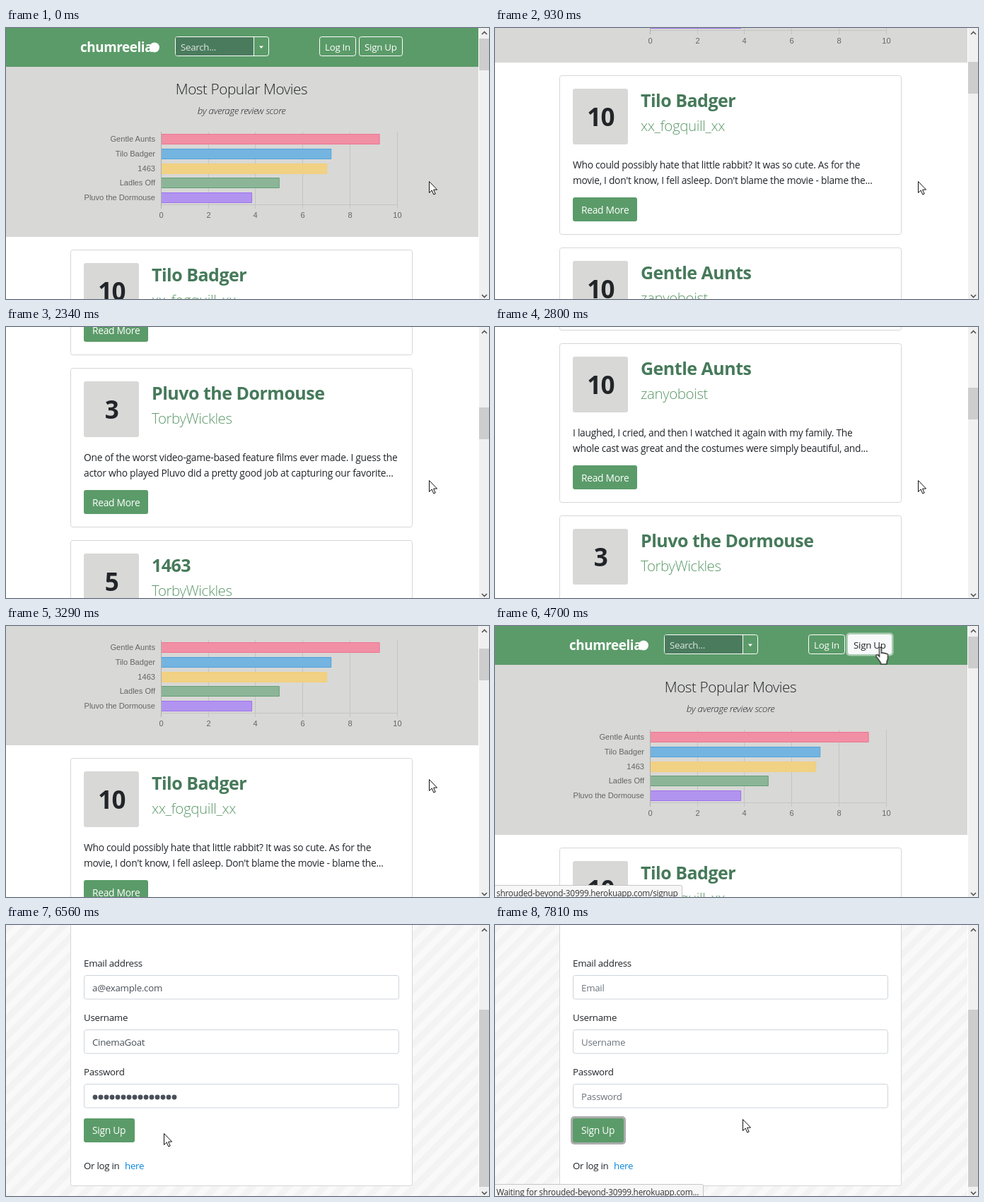
Animation, 683 px wide and 384 px high, one loop 8000 ms. Source, as an HTML page:

```html
<!DOCTYPE html>
<html lang="en">
<head>
<meta charset="utf-8">
<title>Movie reviews</title>
<style>
  html, body { margin: 0; width: 100%; height: 100%; overflow: hidden; background: #fff; }
  svg { display: block; width: 100%; height: 100%; }
  text { font-family: "Open Sans", "Noto Sans", sans-serif; font-size: 13.3px; letter-spacing: -.02em; fill: #212529; white-space: pre; }
  .white { fill: #fff; }
  .search { fill: #dfe7e2; }
  .logo { font-size: 18.8px; font-weight: 700; fill: #fff; }
  .heading { font-size: 20.7px; font-weight: 300; text-anchor: middle; }
  .sub { font-weight: 300; font-style: italic; text-anchor: middle; }
  .axis { font: 11.1px "Liberation Sans", Arial, sans-serif; letter-spacing: 0; fill: #646765; }
  .row { text-anchor: end; }
  .tick { text-anchor: middle; }
  .score { font-size: 35px; font-weight: 700; text-anchor: middle; }
  .title { font-size: 25px; font-weight: 700; fill: #467a5a; }
  .user { font-size: 20.5px; font-weight: 300; fill: #5b9968; }
  .body { font-size: 13.8px; }
  .value { fill: #495057; }
  .hint { fill: #6c757d; }
  .link { fill: #0a86dc; }
  .status { font-size: 11.8px; fill: #333; }
</style>
</head>
<body>
<svg id="stage" viewBox="0 0 683 384"></svg>
<script>
const LOOP = 8000;
const GREEN = '#5b9b69', GREY = '#d8d8d6', LINE = '#d6d6d6';

const text = (x, y, str, cls = '') => `<text x="${x}" y="${y}" class="${cls}">${str}</text>`;
const rect = (x, y, w, h, fill, r = 0) =>
  `<rect x="${x}" y="${y}" width="${w}" height="${h}" rx="${r}" fill="${fill}"/>`;
const box = (x, y, w, h, stroke, fill = '#fff') =>
  `<rect x="${x + .5}" y="${y + .5}" width="${w - 1}" height="${h - 1}" rx="3" fill="${fill}" stroke="${stroke}"/>`;
const path = (d, attrs) => `<path d="${d}" ${attrs}/>`;
const group = (id, content) => `<g id="${id}">${content}</g>`;

const nav = () =>
  rect(0, 0, 668, 55, GREEN) +
  text(105, 34, 'chumreelia', 'logo') +
  '<circle cx="210" cy="27.5" r="7" fill="#fff"/>' +
  box(239, 12, 133, 28, '#fff', GREEN) +
  rect(240, 13, 110, 26, '#4a7b5d', 2) +
  rect(350, 12, 1, 28, '#fff') +
  text(247, 32, 'Search...', 'search') +
  path('M358 25.5h6l-3 3.5z', 'fill="#fff"') +
  box(443, 12, 52, 28, '#fff', GREEN) + text(451, 32, 'Log In', 'white') +
  box(499, 12, 62, 28, '#fff', GREEN) + text(507, 32, 'Sign Up', 'white');

const bars = [
  ['Gentle Aunts', 9.25, '#f18fa5', '#ee748d'],
  ['Tilo Badger', 7.2, '#74b4e0', '#4fa3dc'],
  ['1463', 7.02, '#f1d184', '#f2cf78'],
  ['Ladles Off', 5, '#8cb598', '#64a073'],
  ['Pluvo the Dormouse', 3.84, '#b194ef', '#9d72ee'],
];
const unit = 33.36;

function chart() {
  let out = rect(219, 250, 334, 1, '#c4c4c2');
  for (let v = 0; v <= 10; v += 2) {
    const x = Math.round(219 + v * unit);
    out += rect(x, 147, 1, 109, v ? '#c4c4c2' : '#adadab') + text(x + .5, 269, v, 'axis tick');
  }
  bars.forEach(([name, value, fill, edge], i) => {
    const y = Math.round(150 + i * 20.75), end = 219.5 + value * unit;
    out += text(211, y + 11, name, 'axis row') + rect(220, y, end - 220, 15, fill) +
      path(`M220 ${y + .5}H${end}v14H220`, `fill="none" stroke="${edge}"`);
  });
  return out;
}

const reviews = [
  ['10', 'Tilo Badger', 'xx_fogquill_xx',
    'Who could possibly hate that little rabbit? It was so cute. As for the',
    "movie, I don't know, I fell asleep. Don't blame the movie - blame the..."],
  ['10', 'Gentle Aunts', 'zanyoboist',
    'I laughed, I cried, and then I watched it again with my family. The',
    'whole cast was great and the costumes were simply beautiful, and...'],
  ['3', 'Pluvo the Dormouse', 'TorbyWickles',
    'One of the worst video-game-based feature films ever made. I guess the',
    'actor who played Pluvo did a pretty good job at capturing our favorite...'],
  ['5', '1463', 'TorbyWickles',
    'It was fine, but I kept waiting for something to happen. I guess the',
    'camera work was pretty good, but the story could have been a little...'],
];

const card = ([score, title, user, line1, line2], i) => {
  const y = 314 + i * 244;
  return box(91, y, 484, 226, LINE) + rect(110, y + 19, 78, 79, GREY, 3) +
    text(149.5, y + 72, score, 'score') + text(206, y + 45, title, 'title') +
    text(206, y + 79, user, 'user') +
    text(110, y + 132, line1, 'body') + text(110, y + 154, line2, 'body') +
    rect(110, y + 173, 91, 34, GREEN, 3) + text(122, y + 196, 'Read More', 'white body');
};

const scrollbar = (id, length) =>
  rect(668, 0, 15, 384, '#f0f0f0') + rect(668, 0, 1, 384, '#fff') +
  group(id, rect(669, 15, 14, length, '#cdcdcd')) +
  path('M673 9l3.5-3.5 3.5 3.5M673 378l3.5 3.5 3.5-3.5', 'fill="none" stroke="#555" stroke-width="1.7"');

const home = rect(0, 0, 683, 384, '#fff') +
  group('homePage',
    nav() + rect(0, 55, 668, 241, GREY) +
    text(333, 94, 'Most Popular Movies', 'heading') +
    text(333, 122, 'by average review score', 'sub') +
    chart() + reviews.map(card).join('') +
    group('navRing', rect(496.5, 9.5, 67, 33, '#abcdb3', 5)) +
    group('navHover', rect(499, 12, 62, 28, '#f8f9fa', 3) + text(507, 32, 'Sign Up'))) +
  scrollbar('homeThumb', 45);

const field = (name, y, label, hint, value) =>
  text(110, y - 12, label) + box(110, y, 446, 34.5, '#ced4da') +
  group(name + 'Hint', text(122, y + 23, hint, 'hint')) + group(name + 'Value', value);

const dots = Array.from({ length: 15 }, (_, i) =>
  `<circle cx="${126 + i * 8}" cy="405" r="3.4" fill="#495057"/>`).join('');

const signup = rect(0, 0, 668, 384, 'url(#stripes)') +
  group('signPage',
    nav() + box(91, 73, 484, 458, LINE) +
    text(333, 122, 'Sign Up', 'heading') +
    field('email', 232, 'Email address', 'Email', text(122, 255, 'a@example.com', 'value')) +
    field('user', 309, 'Username', 'Username', text(122, 332, 'CinemaGoat', 'value')) +
    field('pass', 386, 'Password', 'Password', dots) +
    group('formRing', rect(107, 432, 78, 40, '#a9acab', 5)) +
    rect(110, 435, 72, 34, GREEN, 3) +
    group('formHover', rect(110, 435, 72, 34, '#4d8459', 3)) +
    text(122, 457, 'Sign Up', 'white body') +
    text(110, 507, 'Or log in') + text(168, 507, 'here', 'link')) +
  scrollbar('signThumb', 251);

const status = (id, width, str) =>
  group(id, path(`M-1 367.5H${width - 2.5}q2 0 2 2V385H-1z`, 'fill="#f7f7f7" stroke="#c6c6c6"') +
    text(2, 383, str, 'status'));

document.getElementById('stage').innerHTML = `<defs>
  <pattern id="stripes" width="18" height="18" patternUnits="userSpaceOnUse" patternTransform="rotate(45)">
    ${rect(0, 0, 18, 18, '#f9f9f9') + rect(0, 0, 9, 18, '#f3f3f3')}
  </pattern></defs>` +
  group('signup', signup) + group('home', home) +
  status('linkStatus', 265, 'shrouded-beyond-30999.herokuapp.com/signup') +
  status('waitStatus', 295, 'Waiting for shrouded-beyond-30999.herokuapp.com...') +
  group('cursor',
    group('arrow', path('M.5.5V16.5l3.7-3.5 2.6 6 2.4-1-2.6-5.9h5z', 'fill="#fff" stroke="#111"')) +
    group('hand', path('M0 1.5C0-.5 3-.5 3 1.5V9c0-1.5 3.3-1.5 3.3.3 0-1.5 3-1.3 3 .7 0-1.3 2.7-1 2.7 1v5c0 2-1.5 3-1.5 5.5V24H2v-2C0 19-3 15-4.5 13c-1-2 1.5-3 3-1.5l1.5 2z',
      'fill="#fff" stroke="#111" stroke-width="1.2"')));

// Each step holds its style until the next one; step times must differ.
function play(id, steps) {
  const frames = steps.map(([t, style]) => ({ offset: t / LOOP, easing: 'step-end', ...style }));
  frames.push({ ...frames[frames.length - 1], offset: 1 });
  const motion = document.getElementById(id).animate(frames, { duration: LOOP, iterations: Infinity });
  motion.startTime = 0;
}
const move = (id, steps) =>
  play(id, steps.map(([t, x, y]) => [t, { transform: `translate(${x}px, ${y}px)` }]));
const toggle = (id, visible, ...times) =>
  play(id, [0, ...times].map((t, i) => [t, { opacity: visible === (i % 2 === 0) ? 1 : 0 }]));
const scroll = (page, thumb, ratio, steps) => {
  move(page, steps.map(([t, y]) => [t, 0, -y]));
  move(thumb, steps.map(([t, y]) => [t, 0, Math.round(y * ratio)]));
};

scroll('homePage', 'homeThumb', .133, [
  [0, 0], [300, 25], [460, 80], [620, 135], [780, 190], [930, 247], [1090, 310], [1250, 360],
  [1400, 430], [1560, 560], [1710, 700], [1870, 810],
  [2340, 744], [2500, 640], [2650, 535], [2810, 430], [2970, 325], [3130, 225], [3290, 127],
  [3440, 50], [3600, 0]]);
scroll('signPage', 'signThumb', 105 / 161, [
  [0, 0], [5480, 30], [5640, 70], [5930, 115], [6090, 161]]);

move('cursor', [
  [0, 598, 217], [3760, 590, 190], [3920, 575, 130], [4080, 558, 75], [4240, 548, 46],
  [4540, 543.5, 30], [5330, 500, 90], [5480, 440, 160], [5640, 400, 200],
  [5930, 375, 218], [6090, 330, 242], [6250, 290, 264], [6410, 250, 283], [6560, 223, 295],
  [6720, 222, 294], [6880, 220, 293], [7030, 190, 292], [7190, 160, 290],
  [7660, 260, 283], [7810, 350, 275]]);

toggle('home', true, 5170);
toggle('navHover', false, 4540, 5170);
toggle('navRing', false, 4700, 5170);
toggle('linkStatus', false, 4540, 4850);
toggle('waitStatus', false, 4850, 5170, 7660);
toggle('hand', false, 4540, 5170, 7190, 7660);
toggle('arrow', true, 4540, 5170, 7190, 7660);
toggle('formHover', false, 7190, 7660);
toggle('formRing', false, 7350);
for (const [name, time] of [['email', 6090], ['user', 6250], ['pass', 6410]]) {
  toggle(name + 'Value', false, time, 7350);
  toggle(name + 'Hint', true, time, 7350);
}
</script>
</body>
</html>
```
